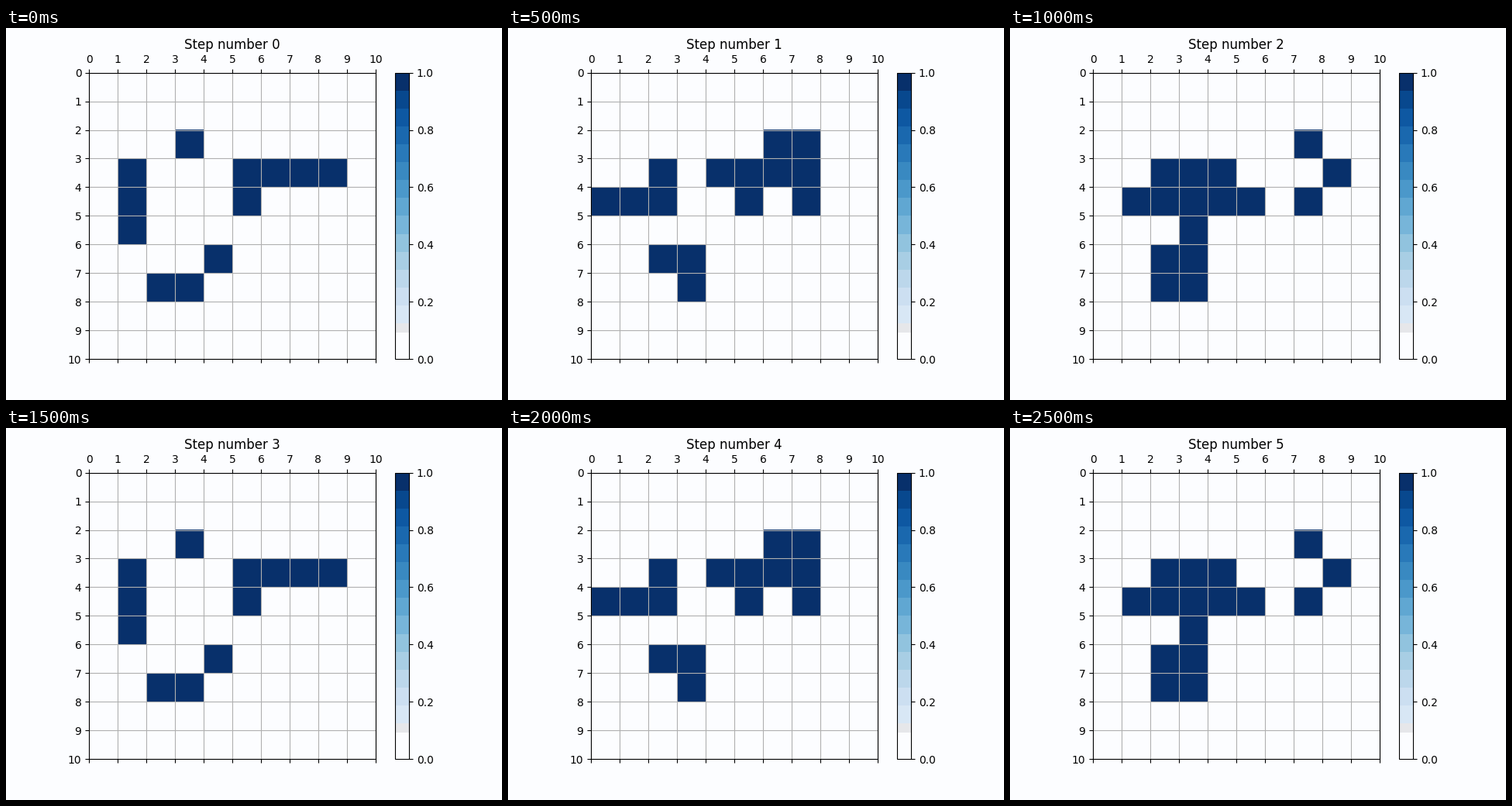
Write a matplotlib script that moves like this. It is 640 px wide and 480 px high and loops after 3 s.

```python
import numpy as np
import matplotlib.pyplot as plt
from matplotlib.animation import FuncAnimation
from matplotlib.colors import ListedColormap, to_rgba

SIZE = 10
STEPS = 6
BAND = 16
PAPER = "#fcfdff"
NAVY = "#08306b"


def banded_blues():
    """Blues in equal flat bands, running from paper to navy."""
    index = np.arange(256)
    colors = plt.get_cmap("Blues")(index // BAND * BAND + BAND // 2)
    colors[:2 * BAND] = to_rgba("#e6e7ea")
    colors[:3 * BAND // 2] = to_rgba(PAPER)
    colors[-BAND:] = to_rgba(NAVY)
    return ListedColormap(colors)


def caterer():
    """An oscillator of period three."""
    grid = np.zeros((SIZE, SIZE), dtype=int)
    grid[2, 3] = grid[4, 5] = grid[6, 4] = 1
    grid[3:6, 1] = 1
    grid[3, 5:9] = 1
    grid[7, 2:4] = 1
    return grid


def evolve(grid):
    """One generation of Conway's Game of Life."""
    padded = np.pad(grid, 1)
    block = sum(padded[r:r + SIZE, c:c + SIZE]
                for r in range(3) for c in range(3))
    return ((block == 3) | ((grid == 1) & (block == 4))).astype(int)


grids = [caterer()]
while len(grids) < STEPS:
    grids.append(evolve(grids[-1]))

plt.rcParams["font.family"] = "DejaVu Sans"
fig, ax = plt.subplots(figsize=(6.4, 4.8), dpi=100, facecolor=PAPER)
ax.set_facecolor(PAPER)
image = ax.matshow(grids[0], cmap=banded_blues(), vmin=0, vmax=1,
                   extent=(0, SIZE, SIZE, 0))
ax.set_xticks(range(SIZE + 1))
ax.set_yticks(range(SIZE + 1))
ax.grid(True)
fig.colorbar(image, ax=ax)
title = ax.set_title("Step number 0", pad=5.28)


def draw(step):
    image.set_data(grids[step])
    title.set_text(f"Step number {step}")
    return image, title


anim = FuncAnimation(fig, draw, frames=STEPS, interval=500,
                     repeat=True, repeat_delay=0)
plt.show()
```
